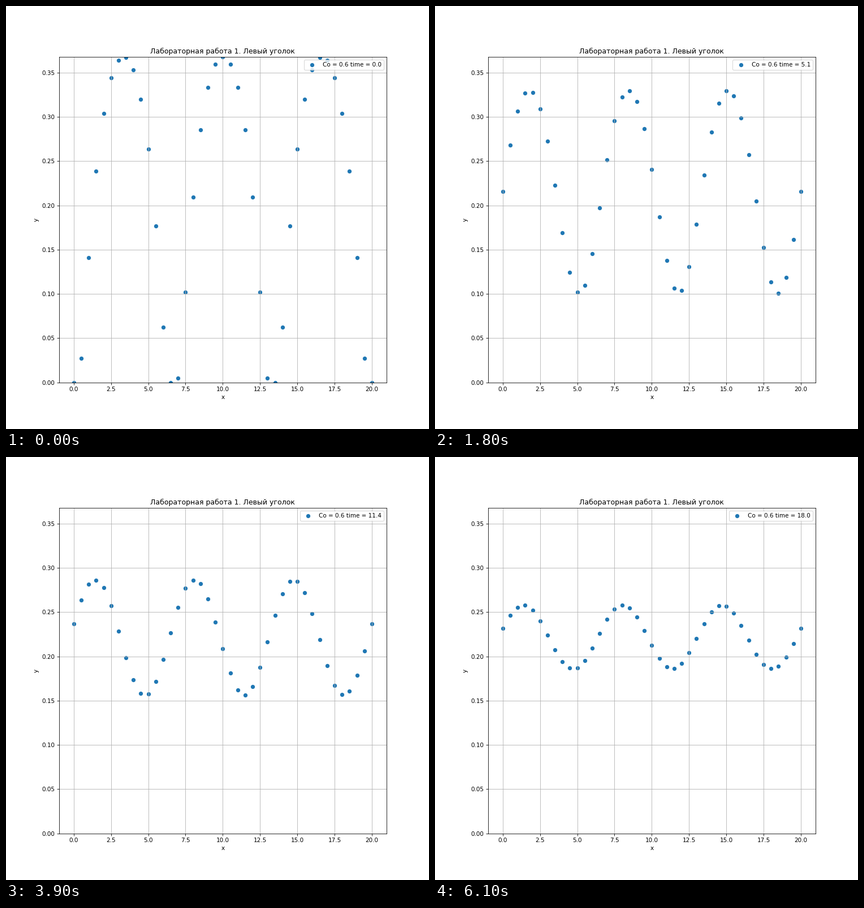
A matplotlib script for the animation above (6.2 s loop, 748x748 px).

```python
import numpy as np
import matplotlib.pyplot as plt
from matplotlib.animation import FuncAnimation

LENGTH, STEP, COURANT = 20.0, 0.5, 0.6
BUMPS = 3
TAU = COURANT * STEP
FRAMES, INTERVAL = 62, 100


def start_profile(x):
    """Row of smooth bumps exp(-1 / (1 - u^2)), each on u in [-1, 1]."""
    u = 2 * (x * BUMPS / LENGTH % 1) - 1
    return np.exp(-1 / np.maximum(1 - u**2, 1e-9))


def upwind(y):
    """One step of the left-corner scheme on a periodic grid."""
    new = y.copy()
    new[1:] = y[1:] - COURANT * (y[1:] - y[:-1])
    new[0] = new[-1]
    return new


x = np.linspace(0, LENGTH, round(LENGTH / STEP) + 1)
layers = [start_profile(x)]
for _ in range(FRAMES - 2):
    layers.append(upwind(layers[-1]))


def label(n):
    return f"Co = {COURANT} time = {n * TAU:.1f}"


fig, ax = plt.subplots(figsize=(10, 10), dpi=74.8)
dots = ax.scatter(x, layers[0], label=label(0))
ax.set(
    title="Лабораторная работа 1. Левый уголок",
    xlabel="x",
    ylabel="y",
    xlim=(-1, 21),
    ylim=(0, np.exp(-1)),
)
ax.grid()
legend = ax.legend(loc="upper right")


def update(frame):
    n = max(frame - 1, 0)  # the initial state is held for two frames
    dots.set_offsets(np.column_stack([x, layers[n]]))
    legend.get_texts()[0].set_text(label(n))
    return dots, legend


anim = FuncAnimation(fig, update, frames=FRAMES, interval=INTERVAL, repeat=True)
plt.show()
```
